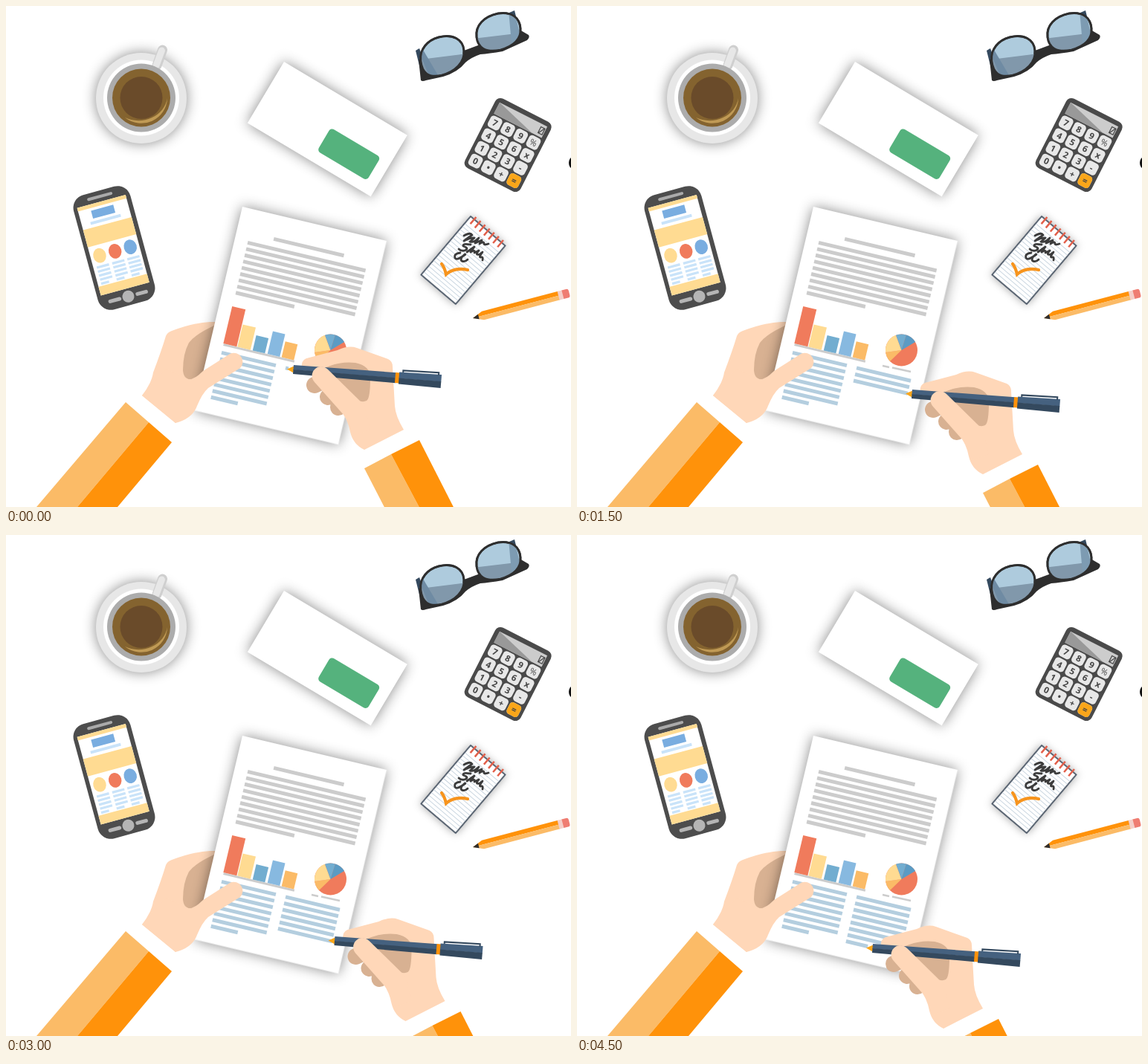
An HTML page without scripts for the animation above (5 s loop, 760 by 674 pixels).

```html
<!DOCTYPE html>
<html lang="en">
<head>
<meta charset="utf-8">
<title>Desk</title>
<style>
  html, body { margin: 0; width: 100%; height: 100%; overflow: hidden; background: #fff; }
  svg { display: block; width: 760px; height: 674px; }
  .shadow { filter: drop-shadow(0 0 9px rgba(0, 0, 0, .46)); }
  .soft { filter: drop-shadow(0 0 6px rgba(0, 0, 0, .36)); }
  .skin { fill: #ffd7b8; }
  .shade { fill: #d8b192; }
  .light { fill: #fbbb67; }
  .orange { fill: #ff920a; }
  .yellow { fill: #ffdb92; }
  .red { fill: #f07b5c; }
  .blue { fill: #72add0; }
  .ink { fill: #b4cedf; }
  .steel { fill: #45617f; }
  .navy { fill: #34495e; }
  .gray { fill: #ccc; }
  .keys text { font: 700 11.5px "Open Sans", sans-serif; fill: #444; text-anchor: middle; }
  .scrawl { fill: none; stroke: #3c3c3c; stroke-width: 2.8; stroke-linecap: round; stroke-linejoin: round; }
</style>
</head>
<body>
<svg viewBox="0 0 760 674">
  <defs>
    <rect id="key" x="-8.5" y="-8.5" width="17" height="17" rx="4.5"/>
    <g id="keyRow" fill="#e8e8e8">
      <use href="#key" x="-29"/><use href="#key" x="-9.7"/><use href="#key" x="9.7"/><use href="#key" x="29"/>
    </g>
    <path id="column" d="M0 0h17M0 5.6h17M0 11.2h17M0 16.8h17M0 22.4h11" stroke="#c9e3f9" stroke-width="3.2"/>
    <path id="lensL" d="M558 74C556 58 567 46 582 42C601 37 615 45 616 60C617 76 604 88 586 93C568 97 560 90 558 74Z"/>
    <path id="lensR" d="M633 42C631 26 643 14 662 10C680 7 691 16 692 30C693 45 682 54 665 59C645 63 635 56 633 42Z"/>
    <clipPath id="clipL"><use href="#lensL"/></clipPath>
    <clipPath id="clipR"><use href="#lensR"/></clipPath>
  </defs>

  <g id="cup">
    <circle class="shadow" cx="182" cy="124" r="61" fill="#e7e7e7"/>
    <circle cx="182" cy="123.500" r="51" fill="#fff"/>
    <path d="M203 80L210.500 59" stroke="#cfcfcf" stroke-width="13" stroke-linecap="round"/>
    <path d="M202 80L209.500 60" stroke="#e7e7e7" stroke-width="9" stroke-linecap="round"/>
    <circle cx="182" cy="123.500" r="46" fill="#acacac"/>
    <circle cx="182" cy="123.500" r="39" fill="#84632f"/>
    <circle cx="182" cy="123.500" r="28.500" fill="#6a4b2a"/>
    <path d="M217 124A35 35 0 0 1 160 150A39 35 0 0 0 217 124Z" fill="#c09a55"/>
  </g>

  <g id="envelope" transform="translate(374 75) rotate(30.8)">
    <rect class="shadow" width="193" height="96" fill="#fff"/>
    <rect x="99.500" y="43.800" width="78" height="36.500" rx="5" fill="#55b27d"/>
  </g>

  <g id="glasses">
    <path d="M551 60L556 57L566 84L558 88Z" class="navy"/>
    <path d="M677 9L684 6L690 30L684 36Z" class="navy"/>
    <path d="M555 72L558 100Q560 102 565 100L588 95Q608 89 618 76Q626 69 638 65Q650 64 668 61L701 46Q705 42 703 39L691 32L616 60Z" fill="#2e2e2e"/>
    <g fill="#aecbdd" stroke="#2e2e2e" stroke-width="3">
      <use href="#lensL"/><use href="#lensR"/>
    </g>
    <g clip-path="url(#clipL)">
      <path d="M550 73L620 64V100H550Z" fill="#8198ab"/>
      <path d="M553 55L561 59L581 93L570 96Z" fill="#6f8ba3"/>
    </g>
    <g clip-path="url(#clipR)">
      <path d="M628 44L696 36V66H630Z" fill="#8198ab"/>
      <path d="M676 6L684 6L692 42L680 50Z" fill="#7d9bb2"/>
    </g>
    <g fill="none" stroke="#2e2e2e" stroke-width="2.500">
      <use href="#lensL"/><use href="#lensR"/>
    </g>
  </g>

  <g id="calculator" class="keys" transform="translate(675.200 187) rotate(27)">
    <rect x="-42" y="-52.500" width="84" height="105" rx="8" fill="#4a4a4a"/>
    <path class="gray" d="M-36-46H36V-29H-36Z"/>
    <path d="M-36-46L22-29H-36Z" fill="#999"/>
    <path d="M28.500-42h6v9h-6zM29-33l5-9" fill="none" stroke="#444" stroke-width="1.200"/>
    <use href="#keyRow" y="-18.500"/><use href="#keyRow" y=".7"/>
    <use href="#keyRow" y="19.900"/><use href="#keyRow" y="39.100"/>
    <use href="#key" x="29" y="39.100" fill="#faa61a"/>
    <text x="-29" y="-14.400">7</text><text x="-9.700" y="-14.400">8</text><text x="9.700" y="-14.400">9</text><text x="29" y="-14.400" style="font-weight:400">%</text>
    <text x="-29" y="4.800">4</text><text x="-9.700" y="4.800">5</text><text x="9.700" y="4.800">6</text><text x="29" y="4.800">x</text>
    <text x="-29" y="24">1</text><text x="-9.700" y="24">2</text><text x="9.700" y="24">3</text><text x="29" y="24">-</text>
    <text x="-29" y="43.200">0</text><text x="-9.700" y="43.200">•</text><text x="9.700" y="43.200">+</text><text x="29" y="43.200">=</text>
  </g>

  <ellipse cx="762" cy="211" rx="5" ry="7.500" fill="#111"/>

  <g id="phone" transform="translate(145.500 325.500) rotate(-15.200)">
    <rect x="-39.500" y="-79.800" width="79" height="159.600" rx="18" fill="#4d4d4d"/>
    <rect x="-34" y="-65" width="67.500" height="122" fill="#fff"/>
    <path class="yellow" d="M-34-65h67.500v5h-67.500zM-34-34h67.500v24h-67.500zM-34 45h67.500v12h-67.500z"/>
    <rect x="-17" y="-56.500" width="31" height="11" fill="#79ade0"/>
    <rect x="-22" y="-42" width="42" height="4" fill="#c9e3f9"/>
    <ellipse class="yellow" cx="-21.500" cy="4.700" rx="8.700" ry="10"/>
    <ellipse class="red" cy="4.500" rx="8.700" ry="10"/>
    <ellipse cx="21.300" cy="4.300" rx="8.700" ry="10" fill="#79ade0"/>
    <use href="#column" x="-29.500" y="19.500"/><use href="#column" x="-8" y="19.500"/><use href="#column" x="13" y="19.500"/>
    <path d="M-16-72H15" stroke="#aaa" stroke-width="4" stroke-linecap="round"/>
    <path d="M-24 68H-11M14 68H26" stroke="#b5b5b5" stroke-width="5" stroke-linecap="round"/>
    <circle cx="1.200" cy="68" r="8" fill="#b5b5b5"/>
  </g>

  <g id="notepad">
    <g transform="translate(625 283) rotate(40.300)">
      <rect class="soft" width="61" height="103" fill="#fff" stroke="#2c3b4d" stroke-width="1.500"/>
      <path d="M30.500 12V99" stroke="#cbd7e1" stroke-width="59" stroke-dasharray="1 4"/>
      <path d="M5 2H58" stroke="#e2604b" stroke-width="12" stroke-dasharray="2.500 5.500"/>
    </g>
    <path class="scrawl" d="M616 309Q624 304 627 308L616 316Q626 311 630 312L624 317Q629 319 636 312L631 319L640 315L637 320Q642 316 643 319Q642 322 649 320"/>
    <path class="scrawl" d="M625 321Q614 319 615 323Q624 326 617 329Q612 330 609 327M620 331L630 324L625 331Q632 327 630 332L636 329Q630 336 637 334L641 331Q635 339 639 338Q642 337 641 342"/>
    <path class="scrawl" d="M611 332Q602 333 604 339Q606 342 612 338Q620 334 617 334Q610 340 613 343Q617 345 621 341"/>
    <path d="M586 347Q590 352 592 361Q603 351 621 355" fill="none" stroke="#f7941d" stroke-width="4.200" stroke-linecap="round"/>
  </g>

  <g id="pencil" transform="translate(628 420) rotate(-14.700)">
    <path class="orange" d="M0 0L14-6H120V0Z"/>
    <path class="light" d="M0 0H120V6H14Z"/>
    <path d="M0 0L8-3.300V3.300Z" fill="#2e2e2e"/>
    <path d="M119-6h7v12h-7z" fill="#f5cfc9"/>
    <path d="M125-6h6q3 0 3 3v6q0 3-3 3h-6z" fill="#ef7d72"/>
  </g>

  <g id="leftArm">
    <path class="light" d="M161 533L41 674H96L192 560Z"/>
    <path class="orange" d="M192 560L96 674H150L223 587Z"/>
    <path class="skin" d="M183 524Q196 507 198 493Q209 464 215 444Q217 439 223 437Q252 426 274 425H284L268 505L228 561Z"/>
    <path class="shade" d="M284 428Q255 441 246 453Q238 468 238 490Q239 503 249 502L275 490Z"/>
  </g>

  <g id="page" transform="translate(318 270) rotate(13.340)">
    <rect class="shadow" width="199.400" height="281.600" fill="#fff"/>
    <path class="gray" d="M51 30h97v5h-97z"/>
    <path d="M99.500 43V109" stroke="#ccc" stroke-width="163" stroke-dasharray="5 3.650"/>
    <path class="gray" d="M18 112.200h81v5h-81zM18 185h98v3h-98z"/>
    <path class="red" d="M17.500 133.500h18.500v51.500h-18.500z"/>
    <path class="yellow" d="M37 154h18v31h-18z"/>
    <path class="blue" d="M58 164h17v21h-17z"/>
    <path d="M78.500 153.500h17v31.500h-17z" fill="#87b9e0"/>
    <path class="light" d="M98 163h17v22h-17z"/>
    <path d="M55.500 195V255" stroke="#b4cedf" stroke-width="75" stroke-dasharray="5 3.800"/>
    <path class="ink" d="M18 256.600h37v5h-37z"/>

    <!-- Lines written by the pen -->
    <g class="ink" transform="translate(106.500 195.200)">
      <rect height="5" width="4"><animate attributeName="width" calcMode="discrete" dur="5s" repeatCount="indefinite" values="4;75" keyTimes="0;.1"/></rect>
      <rect height="5" y="8.750" width="0"><animate attributeName="width" calcMode="discrete" dur="5s" repeatCount="indefinite" values="0;75" keyTimes="0;.1"/></rect>
      <rect height="5" y="17.500" width="0"><animate attributeName="width" calcMode="discrete" dur="5s" repeatCount="indefinite" values="0;4;75" keyTimes="0;.2;.3"/></rect>
      <rect height="5" y="26.250" width="0"><animate attributeName="width" calcMode="discrete" dur="5s" repeatCount="indefinite" values="0;4;75" keyTimes="0;.4;.5"/></rect>
      <rect height="5" y="35" width="0"><animate attributeName="width" calcMode="discrete" dur="5s" repeatCount="indefinite" values="0;34;75" keyTimes="0;.5;.6"/></rect>
      <rect height="5" y="43.750" width="0"><animate attributeName="width" calcMode="discrete" dur="5s" repeatCount="indefinite" values="0;75" keyTimes="0;.6"/></rect>
      <rect height="5" y="52.500" width="0"><animate attributeName="width" calcMode="discrete" dur="5s" repeatCount="indefinite" values="0;4;75" keyTimes="0;.7;.8"/></rect>
      <rect height="5" y="61.250" width="0"><animate attributeName="width" calcMode="discrete" dur="5s" repeatCount="indefinite" values="0;30" keyTimes="0;.9"/></rect>
    </g>
  </g>

  <g id="pie">
    <circle class="red" cx="436.500" cy="463" r="21.500"/>
    <path class="light" d="M436.500 463L421 478A21.500 21.500 0 0 1 415.200 466Z"/>
    <path class="yellow" d="M436.500 463L415.200 466A21.500 21.500 0 0 1 429 442.800Z"/>
    <path class="blue" d="M436.500 463L429 442.800A21.500 21.500 0 0 1 443 442.500Z"/>
    <path d="M436.500 463L443 442.500A21.500 21.500 0 0 1 455 452Z" fill="#5b9bc4"/>
    <path d="M411 484l9 2M424 486.500l25 5.500" stroke="#ccc" stroke-width="2.500"/>
  </g>

  <path id="leftThumb" class="skin" d="M183 524L215 488L247 503Q254 502 265 491L302 467.500A12 12 0 0 1 315 487L272 514Q264 521 257 538Q251 555 228 561Z"/>

  <g id="writer">
    <animateTransform attributeName="transform" type="translate" calcMode="discrete" dur="5s" repeatCount="indefinite"
      values="0 0;63 25;-4 17;64 33;-8 25;24 42;55.500 57;-12 52;53 66;11 67"/>
    <path class="light" d="M482 622L518 603L561 684H514Z"/>
    <path class="orange" d="M518 603L556 584L607 684H561Z"/>
    <path d="M415 510L432 502M433 526L448 514M447 540L458 530" stroke="#d8b192" stroke-width="22" stroke-linecap="round"/>
    <path class="skin" d="M398 486Q396 475 408 473L446 463Q461 456 472 460L514 475Q520 478 520 485L523 538Q524 552 535 570L482 597Q467 590 463 573Q460 556 448 541L424 495Z"/>
    <path class="shade" d="M415 492L436 484Q452 478 470 480Q490 484 490 500Q490 528 485 531Q477 535 465 525L448 541Z"/>
    <g id="pen" transform="translate(377 488.300) rotate(4.600)">
      <path d="M1 0L10-4.500V4.500Z" fill="#faa61a"/>
      <path class="steel" d="M9.500-6L148-7V.5H9.500Z"/>
      <path class="navy" d="M9.500 0H148V7L9.500 6Z"/>
      <path d="M147-7h6v14h-6z" fill="#ff920a"/>
      <path class="steel" d="M152-8L209-9V.5H152Z"/>
      <path class="navy" d="M152 0H209V9L152 8Z"/>
      <path d="M157-8V-10.500L205-11.500V-8" fill="none" stroke="#34495e" stroke-width="2"/>
    </g>
    <path class="skin" d="M415 506A12 12 0 0 1 433 489L482 537L490 570L468 578Q463 560 455 551Z"/>
  </g>
</svg>
</body>
</html>
```
